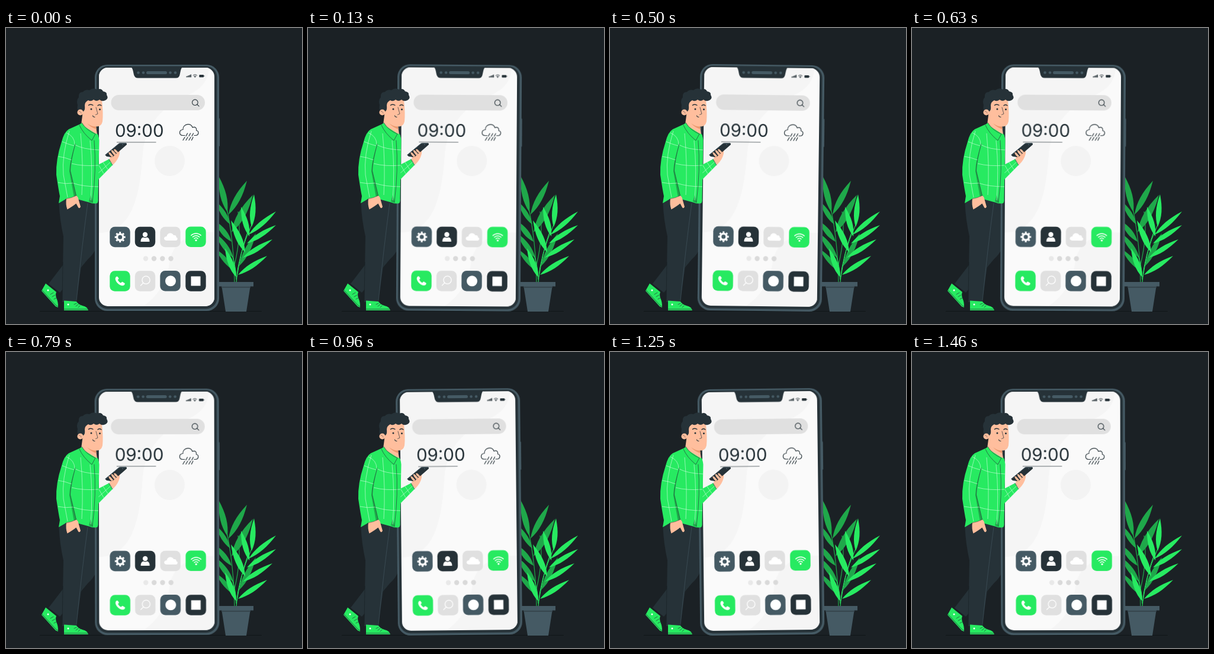
These frames come from a looping animation (500x500 px, 1.5 s). An HTML page:

```html
<!DOCTYPE html>
<html lang="en">
<head>
<meta charset="utf-8">
<title>Phone home screen</title>
<style>
  :root {
    --green: #27ea61;
    --shade: #1fa84a;
    --navy: #263238;
    --slate: #455a64;
    --grey: #e0e0e0;
    --skin: #ffbe9d;
  }
  html, body { margin: 0; width: 100%; height: 100%; overflow: hidden; background: #1b2125; }
  svg { display: block; width: 100%; height: 100%; }
  .green { fill: var(--green); }
  .shade { fill: var(--shade); }
  .navy { fill: var(--navy); }
  .slate { fill: var(--slate); }
  .grey { fill: var(--grey); }
  .skin { fill: var(--skin); }
  .white { fill: #fff; }
  .line { fill: none; stroke: var(--navy); stroke-linecap: round; stroke-linejoin: round; }
  .pale { fill: none; stroke: #fff; stroke-linecap: round; }
  .plaid { fill: none; stroke: #d8ffe4; stroke-width: .75; opacity: .8; }
  .clock { font: 400 29.5px Inter, "Open Sans", sans-serif; text-anchor: middle; fill: var(--navy); }
  #phone { transform-origin: 255px 270px; animation: sway 1.5s linear infinite; }
  @keyframes sway {
    0%, 100% { transform: rotate(0deg); }
    25% { transform: rotate(1deg); }
    75% { transform: rotate(-1deg); }
  }
</style>
</head>
<body>
<svg viewBox="0 0 500 500">
  <defs>
    <clipPath id="screen"><rect x="157" y="67" width="195" height="403" rx="15"/></clipPath>
    <rect id="tile" x="-.2" y="-.2" width="34.400" height="34.400" rx="8.500"/>
  </defs>

  <path d="M57 478.500H432" stroke="#0f1315" stroke-width=".8"/>

  <g id="plant">
    <path d="M386 430Q385 360 372 300M386 400Q398 350 392 310" fill="none" stroke="#1fa84a" stroke-width="1.200"/>
    <g id="back" class="shade"></g>
    <path d="M389 430Q391 385 416 330M390 420Q398 372 408 345M389 425Q388 400 382 385" fill="none" stroke="#27ea61" stroke-width="1"/>
    <g id="front" class="green"></g>
    <path class="slate" d="M364 434H413L406 479H371Z"/>
    <path d="M364 436.500H413L412.500 439H364.500Z" fill="#37474f"/>
    <rect class="slate" x="352" y="429" width="66" height="7.500"/>
  </g>

  <g id="legs">
    <path class="navy" d="M118 291H153L152 372Q148 382 138 391L91 447L72 432L98 398Z"/>
    <path class="navy" d="M92 290H150L139 318L118.500 463H95L97 352Q91 325 89.500 298Z"/>
    <path d="M138 296Q128 370 119 461" fill="none" stroke="#455a64" stroke-width=".6"/>
    <path d="M96 395L95 461" fill="none" stroke="#192024" stroke-width=".6"/>
  </g>

  <g id="shoes">
    <path class="green" d="M67 431.500L85 446Q83 451 85.500 457Q88.500 464 88 472L84 470.500L60 444Z"/>
    <path class="line" d="M61 443L84.500 468.500L88 470.500M75 450l5-3M78 454l5-3M81 458l4-2" stroke-width=".7"/>
    <circle cx="71" cy="443" r="1.500" class="white"/>
    <path class="green" d="M98 460.500L119 462Q122 467 129 469Q138 471 139 477H98Z"/>
    <path class="line" d="M98 475H138M115 467l4-2M118 470l4-3M122 472l3-3" stroke-width=".7"/>
    <circle cx="105" cy="467" r="1.500" class="white"/>
  </g>

  <g id="phone">
    <rect class="slate" x="357" y="152" width="4" height="48" rx="1.500"/>
    <rect class="slate" x="150" y="62" width="210" height="416" rx="21"/>
    <rect class="navy" x="153" y="64.500" width="203.500" height="410" rx="18.500"/>
    <g clip-path="url(#screen)">
      <rect x="157" y="67" width="195" height="403" fill="#fafafa"/>
      <path d="M157 67H343Q342 98 308 113C262 133 235 165 231 212C227 270 218 346 157 346Z" fill="#f5f5f5"/>
      <path d="M352 345C315 343 283 360 277 392C272 425 262 448 232 470H352Z" fill="#f5f5f5"/>
      <circle cx="276.500" cy="224.500" r="25.500" fill="#f3f3f3"/>
      <path class="navy" d="M211 66Q213.500 67.500 214.500 72L216 79Q217.500 84.500 223 84.500H287Q292.500 84.500 293.500 79L295 72Q296 67.500 298 66Z"/>
    </g>
    <g class="slate">
      <rect x="237" y="73" width="35" height="5" rx="2.500"/>
      <circle cx="223.500" cy="75.500" r="2.300"/><circle cx="232" cy="75.500" r="2.300"/>
      <circle cx="277.500" cy="75.500" r="2.300"/><circle cx="286" cy="75.500" r="2.300"/>
    </g>

    <g class="navy">
      <path d="M304.500 81.500h1.300v1.800h-1.300zM306.300 80.800h1.300v2.500h-1.300zM308.100 80h1.300v3.300h-1.300zM309.900 79.200h1.300v4.100h-1.300zM311.700 78.500h1.300v4.800h-1.300z"/>
      <rect x="326.300" y="79" width="7.700" height="4.200" rx="1"/>
      <rect x="334.500" y="80.200" width=".8" height="1.800"/>
      <circle cx="319.300" cy="82.700" r=".9"/>
    </g>
    <path class="line" d="M316 80q3.300-2.800 6.600 0M317.500 81.500q1.800-1.500 3.600 0" stroke-width=".9"/>

    <rect class="grey" x="177.500" y="113" width="158.500" height="26" rx="13"/>
    <g class="line" stroke-width="1.100">
      <circle cx="319.300" cy="125.700" r="4.800"/><path d="M322.800 129.200l3.200 3"/>
    </g>

    <text class="clock" x="225.200" y="184">09:00</text>
    <path d="M187 193H253.500" stroke="#263238" stroke-width=".7"/>

    <g class="line" stroke-width="1.200">
      <path d="M302 181.500H298.500C292 181 291.500 172.500 299 171.500C298.500 161.500 313 159.500 315 168C320 166 322.500 169.500 321.500 173C326.500 174 326 181.500 320 181.500H318"/>
      <path d="M306.500 178l-2.500 4.500M311.500 178l-2.500 4.500M316.500 178l-2.500 4.500M302 184.500l-3 5M307 184.500l-3 5M312 184.500l-3 5M316 184.500l-2.500 5"/>
    </g>

    <use href="#tile" x="175.500" y="336" class="slate"/>
    <use href="#tile" x="218" y="336" class="navy"/>
    <use href="#tile" x="260.500" y="336" class="grey"/>
    <use href="#tile" x="303.500" y="335.800" class="green"/>
    <use href="#tile" x="175.500" y="410.500" class="green"/>
    <use href="#tile" x="218" y="410.500" class="grey"/>
    <use href="#tile" x="260.500" y="410.300" class="slate"/>
    <use href="#tile" x="303.500" y="410.500" class="navy"/>

    <g transform="translate(192.700 353.300)">
      <circle r="5.200" fill="none" stroke="#fff" stroke-width="3.400"/>
      <circle r="7.700" fill="none" stroke="#fff" stroke-width="2.600" pathLength="16" stroke-dasharray="1 1" stroke-dashoffset=".5"/>
    </g>
    <g class="white">
      <circle cx="235" cy="349" r="4.200"/>
      <path d="M227.500 361Q227.500 354 232 353.500Q235 355.500 238 353.500Q242.500 354 242.500 361Z"/>
      <path d="M271 359C265.500 358.500 266 352 271.500 352C272 345.500 281 344.500 283 350C287 349.500 288 352 287.500 353.500C291 354 290 359 287 359Z"/>
      <circle cx="321" cy="358.600" r="1.600"/>
    </g>
    <path class="pale" d="M312.800 350.300a11.800 11.800 0 0 1 16.400 0M315.400 353a8 8 0 0 1 11.200 0M318 355.700a4.300 4.300 0 0 1 6 0" stroke-width="1.500"/>

    <circle cx="236" cy="389.500" r="4.200" fill="#e9e9e9"/>
    <g fill="#dadada">
      <circle cx="250" cy="389.500" r="4.200"/><circle cx="264.300" cy="389.500" r="4.200"/><circle cx="278.500" cy="389.500" r="4.200"/>
    </g>

    <path class="white" d="M187 419.800Q184.500 421 184.700 424.500C186 430 191.500 435 197 435.300Q200 435 200.800 432.500Q201 431.500 200 430.800L197 428.900Q196 428.500 195.200 429.500L194 430.800Q190.500 429 188.700 425.500L190 424.300Q190.800 423.500 190.300 422.500L188.600 420.200Q188 419.400 187 419.800Z"/>
    <g class="pale" stroke-width="1.300">
      <circle cx="236.500" cy="425.800" r="6.600"/><path d="M231.800 430.600l-4.300 4.400"/>
    </g>
    <circle class="white" cx="278" cy="427.300" r="9"/>
    <rect class="white" x="312.500" y="419.500" width="16" height="16"/>
  </g>

  <g id="man">
    <path class="skin" d="M175 224L176 213Q179 208 183 208L190 201Q193 204 192 212Q190 222 181 231Z"/>
    <path class="navy" d="M167.500 214.500L191 195Q192 194.200 194 194.200L203 194.500Q205 195.500 203.500 197.500L181 217Q179.500 218.500 177 218L170 217Z"/>
    <path d="M167.500 214.500L191 195L203 194.500" fill="none" stroke="#455a64" stroke-width=".8"/>
    <circle cx="197" cy="197" r=".9" class="slate"/>
    <path class="skin" d="M173 210.500q2-1.500 4 1l4 4.500l-2 2.500l-4-4zM177.500 206.800q2-1.500 4 1l4.500 5l-3 2.500l-4-5zM182 205q2-1 4 1l3.500 4l-2 2l-4-3.500z"/>
    <path class="green" d="M152 233L174 221.500L180 231.500L152 260Z"/>
    <path class="plaid" d="M155 246L177 226M164 227l8 12M157 232l8 14"/>
    <path class="line" d="M174 221.500l6 10" stroke-width=".7"/>

    <path class="green" d="M128 161L106 171Q98 176 94 192Q84 222 85 248Q89 275 91 284L89 296L101 289H120L142 295Q147 297.500 154 296Q156 294 155.500 288L157.500 190Q157 182 153 177Z"/>
    <path class="shade" d="M117 196Q109 225 108.500 241L118.500 283L115 286L107 242Q108 222 117 196Z"/>
    <path class="shade" d="M143 282L147 296L145 295L140 293Z"/>
    <path class="plaid" d="M102 177Q116 183 116 197Q130 205 157 206M95 192Q104 196 115 199M88 217Q98 218 111 223M111 229Q130 234 156 232M113 262Q130 268 156 268M88 261Q100 264 113 262M126 178Q131 230 128 282M142 190Q147 240 143 291M107 174Q94 215 97 248L104 286"/>
    <path class="line" d="M149 190Q153 240 146 294M117 196Q109 225 108.500 241L118.500 283" stroke-width=".65"/>
    <path class="skin" d="M102 288L110 286.500L119 283L121.500 286L126 302Q124 306 122 303L118.500 296.500Q113 301 103.500 306.500Q100.500 298 102 288Z"/>
    <path class="line" d="M101 289Q111 287 119 283" stroke-width=".5"/>

    <path class="skin" d="M131 124Q148 116 162 122Q164.500 145 163 158Q161 167 152 166.500L154 180L127 163L129 148Z"/>
    <path d="M137 161Q144 166.500 152 166.500L153 171Q143 168 137 161Z" fill="#eb996e"/>
    <path class="navy" d="M126 147Q119 140 121 130Q118 122 123 117Q122 108 130 108Q134 103 141 105Q147 100 154 104Q161 101 164 107Q171 108 170 113Q174 119 168 122Q162 125 158 121Q153 125 148 121Q143 125 139 122Q133 125 133 131Q134 139 130.500 141Q128 144 126 147Z"/>
    <circle class="skin" cx="125.500" cy="142.500" r="5"/>
    <path class="line" d="M123 141Q126 140 127 144" stroke-width=".5"/>
    <path class="green" d="M128 160Q136 173 151 179L145 190Q130 178 124 164ZM152 178L156 181L155 188L150 184Z"/>
    <path class="line" d="M128 160Q136 173 151 179L145 190Q130 178 124 164" stroke-width=".65"/>

    <g class="line" stroke-width="1.100">
      <path d="M139.500 130.500Q142.500 128 147 130.500M155 131Q158 128.500 161 131" stroke-width="1.400"/>
      <path d="M146.500 148Q147 150.500 150 150.500"/>
      <path d="M152 134L155 145L151.500 146.500" stroke-width=".7"/>
    </g>
    <circle class="navy" cx="144" cy="137" r="1.500"/>
    <circle class="navy" cx="158.500" cy="137.500" r="1.500"/>
  </g>
</svg>
<script>
  // Each leaf: base x, base y, tip x, tip y, width
  const leaves = {
    back: [
      [374, 311, 359, 250, 10], [376, 315, 407, 258, 10], [381, 345, 417, 282, 12],
      [379, 332, 354, 292, 8], [381, 361, 352, 325, 9], [384, 388, 353, 346, 9],
      [386, 410, 354, 373, 8], [394, 402, 422, 347, 9]
    ],
    front: [
      [415, 336, 419, 281, 9], [410, 349, 456, 310, 8], [407, 364, 456, 333, 8],
      [400, 388, 450, 357, 8], [392, 417, 441, 385, 8], [411, 352, 397, 302, 9],
      [404, 379, 380, 325, 10], [389, 421, 370, 372, 9]
    ]
  };

  function leaf([x, y, tx, ty, w]) {
    const dx = tx - x, dy = ty - y, len = Math.hypot(dx, dy);
    const nx = -dy / len * w * .7, ny = dx / len * w * .7;
    const at = (t, side) => `${x + dx * t + nx * side} ${y + dy * t + ny * side}`;
    return `M${x} ${y}C${at(.3, 1)} ${at(.6, .95)} ${tx} ${ty}C${at(.6, -.95)} ${at(.3, -1)} ${x} ${y}Z`;
  }

  for (const [id, list] of Object.entries(leaves)) {
    const path = document.createElementNS("http://www.w3.org/2000/svg", "path");
    path.setAttribute("d", list.map(leaf).join(""));
    document.getElementById(id).append(path);
  }
</script>
</body>
</html>
```
